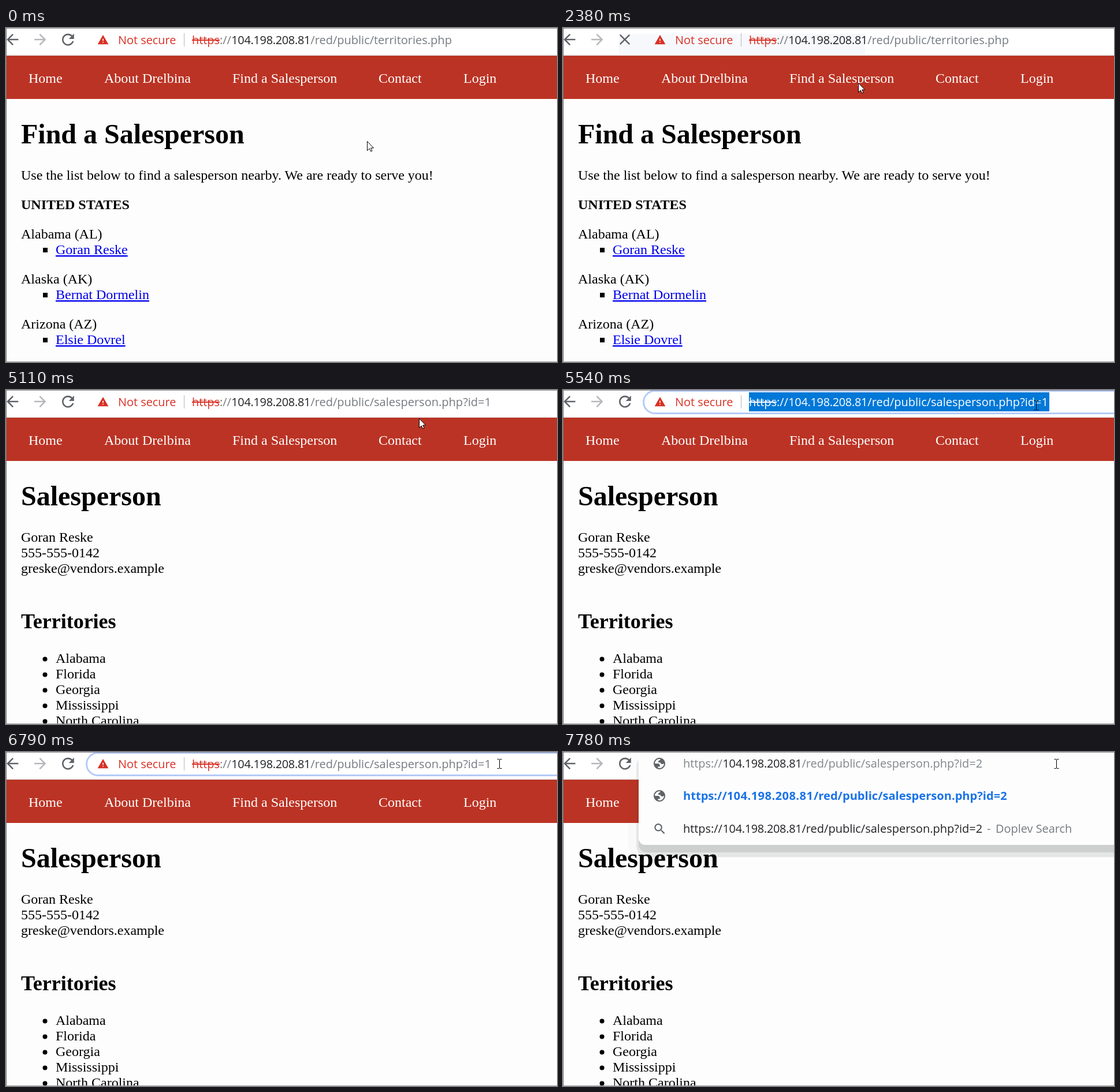
Recreate the animation shown at these times as an HTML page. Size 954x579 px, loop 8 s.

```html
<!DOCTYPE html>
<html lang="en">
<head>
<meta charset="utf-8">
<title>Find a Salesperson</title>
<style>
  html, body { margin: 0; width: 100%; height: 100%; overflow: hidden; background: #fff; }
  svg { display: block; width: 954px; height: 579px; }
  .page { font: 24px "Liberation Serif", "Times New Roman", serif; }
  .bold { font-weight: bold; }
  .h1 { font-weight: bold; font-size: 48px; }
  .h2 { font-weight: bold; font-size: 36px; }
  .link { fill: #00e; text-decoration: underline; }
  .ui { font: 19.9px "Open Sans", "Noto Sans", sans-serif; }
  .path { font-size: 20px; }
  .strong { font-weight: 700; font-size: 20.1px; }
  .strike { text-decoration: line-through; }
</style>
</head>
<body>
<svg id="stage" viewBox="0 0 954 579" xmlns="http://www.w3.org/2000/svg"></svg>
<script>
const LOOP = 8000;
const INK = '#202124', GREY = '#757a80', ICON = '#5f6368', RED = '#d93025', BLUE = '#1a73e8';
const HOST = '104.198.208.81';
const DETAIL = '/red/public/salesperson.php?id=';

const ICONS = {
  back: 'M20 11H7.83l5.59-5.59L12 4l-8 8 8 8 1.41-1.41L7.83 13H20v-2z',
  forward: 'M12 4l-1.41 1.41L16.17 11H4v2h12.17l-5.58 5.59L12 20l8-8z',
  reload: 'M17.65 6.35C16.2 4.9 14.21 4 12 4c-4.42 0-7.99 3.58-7.99 8s3.57 8 7.99 8c3.73 0 6.84-2.55 7.73-6h-2.08c-.82 2.33-3.04 4-5.65 4-3.31 0-6-2.69-6-6s2.69-6 6-6c1.66 0 3.14.69 4.22 1.78L13 11h7V4l-2.35 2.35z',
  stop: 'M19 6.41L17.59 5 12 10.59 6.41 5 5 6.41 10.59 12 5 17.59 6.41 19 12 13.41 17.59 19 19 17.59 13.41 12z',
  warning: 'M1 21h22L12 2 1 21zm12-3h-2v-2h2v2zm0-4h-2v-4h2v4z',
  globe: 'M12 22C6.477 22 2 17.523 2 12S6.477 2 12 2s10 4.477 10 10-4.477 10-10 10zM4 12h4.4c3.407.022 4.922 1.73 4.543 5.127H9.488v2.47a8.004 8.004 0 0 0 10.498-8.083C19.327 12.504 18.332 13 17 13c-2.137 0-3.206-.916-3.206-2.75h-3.748c-.274-2.728.683-4.092 2.87-4.092 0-.975.327-1.597.811-1.97A8.004 8.004 0 0 0 4 12z',
  search: 'M15.5 14h-.79l-.28-.27C15.41 12.59 16 11.11 16 9.5 16 5.91 13.09 3 9.5 3S3 5.91 3 9.5 5.91 16 9.5 16c1.61 0 3.09-.59 4.23-1.57l.27.28v.79l5 4.99L20.49 19l-4.99-5zm-6 0C7.01 14 5 11.99 5 9.5S7.01 5 9.5 5 14 7.01 14 9.5 11.99 14 9.5 14z'
};

const rect = (x, y, w, h, fill, extra = '') =>
  `<rect x="${x}" y="${y}" width="${w}" height="${h}" fill="${fill}" ${extra}/>`;
const text = (x, y, str, cls = '', fill = '#000', extra = '') =>
  `<text x="${x}" y="${y}" class="${cls}" fill="${fill}" ${extra}>${str}</text>`;
const icon = (name, x, y, scale, fill = ICON) =>
  `<path transform="translate(${x} ${y}) scale(${scale})" fill="${fill}" fill-rule="evenodd" d="${ICONS[name]}"/>`;
const group = (id, body) => `<g id="${id}">${body}</g>`;

// Host and path of an address, placed after its scheme
const hostAndPath = (x, y, path, host, rest) =>
  text(x, y, HOST, '', host, 'letter-spacing="-.3"') + text(x + 137, y, path, 'path', rest);

const address = (x, y, path, scheme, host, rest) =>
  text(x, y, 'https://', '', scheme) + hostAndPath(x + 68.5, y, path, host, rest);

const struckAddress = (path, https, scheme, host, rest) =>
  text(322, 28, 'https', 'strike', https) + text(370, 28, '://', '', scheme) +
  hostAndPath(390.3, 28, path, host, rest);

const boldAddress = (x, y, path) =>
  text(x, y, 'https://', 'strong', BLUE) +
  text(x + 75.7, y, HOST, 'strong', BLUE, 'letter-spacing=".45"') +
  text(x + 226, y, path, 'strong', BLUE);

function territoriesPage() {
  const people = [['Alabama (AL)', 'Goran Reske'], ['Alaska (AK)', 'Bernat Dormelin'], ['Arizona (AZ)', 'Elsie Dovrel']];
  return text(26, 200, 'Find a Salesperson', 'h1') +
    text(26, 263, 'Use the list below to find a salesperson nearby. We are ready to serve you!') +
    text(26, 314, 'UNITED STATES', 'bold') +
    people.map(([state, name], i) => {
      const y = 365 + 78 * i;
      return text(26, y, state) + rect(64, y + 16, 8, 8, '#000') + text(86, y + 27, name, 'link', '#00e');
    }).join('');
}

function personPage() {
  const lines = ['Goran Reske', '555-555-0142', 'greske@vendors.example'];
  const states = ['Alabama', 'Florida', 'Georgia', 'Mississippi', 'North Carolina'];
  return text(26, 200, 'Salesperson', 'h1') +
    lines.map((s, i) => text(26, 263 + 27 * i, s)).join('') +
    text(26, 413, 'Territories', 'h2') +
    states.map((s, i) => `<circle cx="67.5" cy="${466.5 + 27 * i}" r="4"/>` + text(86, 473 + 27 * i, s)).join('');
}

function navBar() {
  const items = [['Home', 39], ['About Drelbina', 170], ['Find a Salesperson', 392], ['Contact', 645], ['Login', 792]];
  return rect(0, 48, 954, 75, '#bb3324') + items.map(([s, x]) => text(x, 95, s, '', '#fff')).join('');
}

function panel(bottom) {
  return rect(113, 1, 900, bottom + 22, '#3c4043', 'rx="24" opacity=".02"') +
    rect(127, 6, 900, bottom + 15, '#3c4043', 'rx="20" opacity=".11"') +
    rect(131, 10, 900, bottom + 3, '#3c4043', 'rx="14" opacity=".13"') +
    rect(131, -12, 900, bottom + 12, '#fdfdfd', 'rx="11"');
}

const rowY = i => 20 + 57 * i - (i ? 1 : 0);
const globeRow = i => icon('globe', 155, rowY(i) - 12, 1);

function searchRow(i, path, dashX) {
  const y = rowY(i) + 7;
  return icon('search', 155.3, rowY(i) - 12, 1.03) +
    address(208, y, path, INK, INK, INK) +
    text(dashX, y, '-', '', GREY) + text(dashX + 15, y, 'Doplev Search', '', GREY);
}

function suggestion(i, name, dashX, urlX) {
  const y = rowY(i) + 7;
  return globeRow(i) + text(208, y, 'Salesperson: ' + name, '', INK) +
    text(dashX, y, '-', '', GREY) + boldAddress(urlX, y, DETAIL + i);
}

const typedRows = path =>
  globeRow(0) + address(208, 27, path, '#80868b', INK, '#80868b') +
  globeRow(1) + boldAddress(208, rowY(1) + 7, path);

const CURSORS = {
  arrow: 'M.5 .5V16.5L4.2 13L6.7 18L9 17L6.7 12H11.5Z',
  hand: 'M-1.5 1Q0 -1.5 1.5 1V7Q3.4 6 4.8 7.5Q6.4 6.6 7.6 8.2Q9.4 8 9.4 10V14.5L8 17.5V20H-1V18L-5.5 11.8Q-4.6 9.6 -1.5 12Z',
  beam: 'M-4 -7.5H-1.2L0 -6.8L1.2 -7.5H4M0 -7V8M-4 8.5H-1.2L0 7.8L1.2 8.5H4'
};

const stage = document.getElementById('stage');
stage.innerHTML =
  '<defs><clipPath id="view"><rect width="954" height="578"/></clipPath></defs>' +
  rect(0, 0, 954, 579, '#fff') +
  rect(0, 123, 954, 456, '#fdfdfd') +
  '<g class="page" clip-path="url(#view)">' + navBar() +
    group('territories', territoriesPage()) + group('person', personPage()) + '</g>' +
  rect(0, 47, 954, 1, '#dadce0') +
  group('tint', rect(97, 10, 426, 36, '#f7f8fb')) +
  group('hover', rect(140, 1, 900, 41, '#f7f8fb', 'rx="20.5"')) +
  group('ring', rect(139.5, 1.5, 900, 39, '#fff', 'rx="19.5" stroke="#b3cbf8" stroke-width="3"')) +
  icon('back', -4, 4.8, 1.27) + icon('forward', 44, 4.8, 1.27, '#b5b7ba') +
  group('reload', icon('reload', 91.8, 4.6, 1.3)) +
  group('stop', icon('stop', 91.4, 4.4, 1.3)) +
  '<g class="ui">' +
    icon('warning', 157.8, 10.3, .85, RED) +
    text(194, 28, 'Not secure', '', RED) + rect(308, 9, 1, 23, '#b4b6b9') +
    group('listUrl', struckAddress('/red/public/territories.php', RED, GREY, INK, GREY)) +
    group('personUrl', struckAddress(DETAIL + '1', RED, GREY, INK, GREY)) +
    group('selected', rect(322, 4, 520, 33, '#0078d7') +
      struckAddress(DETAIL + '1', '#fff', '#fff', '#fff', '#fff')) +
    group('editing', panel(332) + typedRows(DETAIL) +
      suggestion(2, 'Idle Napsome (FIRED FOR STEALING)', 676, 690.5) +
      suggestion(3, "Trial O'Sampleson (NOT PUBLIC UNTIL SEPT. 1)", 770, 785) +
      suggestion(4, 'Rosalia Pendrick', 490, 505) +
      searchRow(5, DETAIL, 723.5)) +
    group('typed', panel(161) + typedRows(DETAIL + '2') + searchRow(2, DETAIL + '2', 734)) +
  '</g>' +
  `<rect id="caret" y="4" width="1" height="28" fill="${ICON}"/>` +
  rect(0, 0, 954, 1, '#8a8a8a') + rect(0, 0, 1, 579, '#777') + rect(0, 578, 954, 1, '#a0a0a0') +
  '<path id="cursor" stroke="#000" stroke-width="1"/>';

const el = id => document.getElementById(id);
const show = (id, on) => el(id).setAttribute('visibility', on ? 'visible' : 'hidden');
const within = (t, a, b) => t >= a && t < b;

// start, end, steps, target x, target y, easing
const smooth = p => p * p * (3 - 2 * p);
const settle = p => 1 - (1 - p) ** 3;
const MOVES = [
  [1240, 2130, 7, 511, 95, smooth],
  [2520, 3310, 7, 199, 407, smooth],
  [3430, 3580, 2, 142, 386, smooth],
  [4010, 4010, 1, 142, 391, smooth],
  [4410, 5110, 6, 715, 49, smooth],
  [5260, 5840, 5, 848, 20, settle],
  [6520, 6650, 2, 854, 20, smooth]
];

function pointer(t) {
  let x = 625, y = 196;
  for (const [start, end, steps, toX, toY, ease] of MOVES) {
    if (t < start) break;
    const gap = (end - start) / Math.max(1, steps - 1) || 1;
    const p = ease(Math.min(steps, Math.floor((t - start) / gap + 0.02) + 1) / steps);
    x += (toX - x) * p;
    y += (toY - y) * p;
  }
  return [Math.round(x), Math.round(y)];
}

function draw(t) {
  const person = t >= 3880;
  const loading = within(t, 2380, 2520);
  const open = t >= 7070;
  show('territories', !person);
  show('person', person);
  show('tint', loading);
  show('stop', loading);
  show('reload', !loading);
  show('hover', within(t, 5260, 5540));
  show('ring', within(t, 5540, 7070));
  show('listUrl', !person);
  show('personUrl', within(t, 3880, 5540) || within(t, 6250, 7070));
  show('selected', within(t, 5540, 6250));
  show('editing', within(t, 7070, 7370));
  show('typed', t >= 7370);

  show('caret', within(t, 6250, 6790) || within(t, 7070, 7780));
  el('caret').setAttribute('x', !open ? 842 : t < 7370 ? 718 : 728);

  const hand = within(t, 1830, 2380) || within(t, 3430, 4010);
  const kind = t >= 5260 ? 'beam' : hand ? 'hand' : 'arrow';
  const [x, y] = pointer(t);
  const cursor = el('cursor');
  cursor.setAttribute('d', CURSORS[kind]);
  cursor.setAttribute('fill', kind === 'beam' ? 'none' : '#fff');
  cursor.setAttribute('transform', `translate(${x + (kind === 'beam' ? .5 : 0)} ${y})`);
}

const begin = performance.now();
function tick() {
  draw((performance.now() - begin) % LOOP);
  requestAnimationFrame(tick);
}
tick();
</script>
</body>
</html>
```
